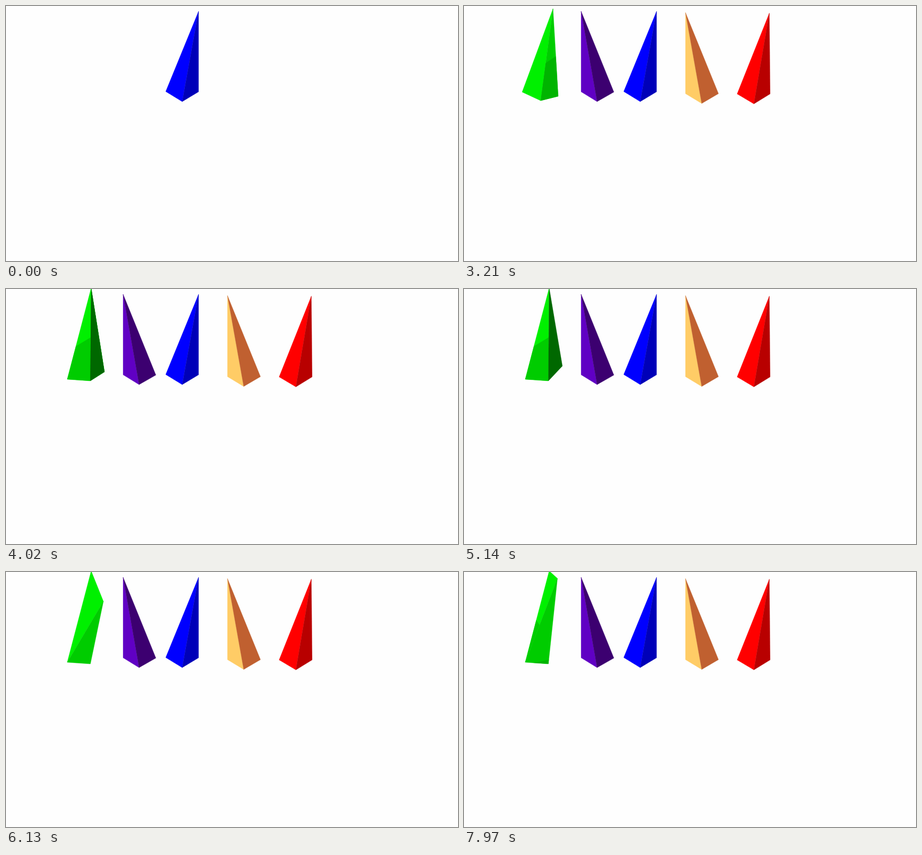
An HTML page with a canvas that plays this animation: 849x480 px, repeating every 8 s.

```html
<!DOCTYPE html>
<html>
<head>
<meta charset="utf-8">
<style>
html, body { margin: 0; height: 100%; overflow: hidden; background: #fefefe; }
canvas { display: block; }
</style>
</head>
<body>
<canvas id="stage" width="849" height="480"></canvas>
<script>
const ctx = document.getElementById('stage').getContext('2d');
const BRIGHT = '#00f000', MID = '#00cc00', DIM = '#00b400', DARK = '#008c00', DEEP = '#006800';

const clamp = (v, lo, hi) => Math.min(hi, Math.max(lo, v));
const mix = (a, b, u) => a.map((v, i) => v + (b[i] - v) * u);
const curve = (a, b, c, u) => a + b * u + c * u * u;

function trace(points) {
  ctx.beginPath();
  points.forEach(p => ctx.lineTo(...p));
  ctx.closePath();
}

// Each band [colour, y, slope] covers the face below a line through (150, y).
function face(points, color, bands = []) {
  ctx.save();
  trace(points);
  ctx.fillStyle = ctx.strokeStyle = color;
  ctx.lineWidth = 0.4;
  ctx.fill();
  ctx.stroke();
  ctx.clip();
  for (const [shade, y, slope] of bands) {
    trace([[50, y - 100 * slope], [250, y + 100 * slope], [250, 600], [50, 600]]);
    ctx.fillStyle = shade;
    ctx.fill();
  }
  ctx.restore();
}

function pyramid(apex, left, front, right, leftColor, rightColor) {
  face([apex, left, front], leftColor);
  face([apex, front, right], rightColor);
}

function turning(u) {
  const apex = [curve(169, -9, 0, u), curve(7, -9, 0, u)];
  const left = [curve(109.2, -1.5, 7.3, u), curve(160, 10, 0, u)];
  const front = [curve(140.3, 18, 0, u), curve(179.3, -5, -1.3, u)];
  const right = [curve(174, 15, -4, u), curve(173, -14, -3, u)];
  const rise = (from, to) => 200 - 220 * clamp((u - from) / (to - from), 0, 1);
  face([apex, left, front], BRIGHT, [[MID, 200 - 103.5 * clamp((u - 0.6) / 0.4, 0, 1), -0.6]]);
  face([apex, front, right], MID, [
    [DIM, rise(0, 0.5), -0.65], [DARK, rise(0.35, 0.75), -0.65], [DEEP, rise(0.6, 0.95), -0.65]
  ]);
}

function unfolding(step, slide) {
  const apex = [160, -2], left = [115, 170], front = [158.5, 173];
  const u = slide / 12;
  const right = mix(mix([185, 156], [182, 9], step / 54), [175.5, 12], u);
  if (step < 30) {
    const shade = step < 6 ? DEEP : step < 13 ? DARK : step < 22 ? DIM : MID;
    face([apex, left, front], BRIGHT, [[MID, 96.5, -0.6]]);
    face([apex, front, right], shade);
  } else {
    face([apex, left, right], BRIGHT, u ? [[MID, 200 - 88 * u, 1.5]] : []);
    face([left, front, right], MID, u ? [[DIM, 180 - 13 * u, -0.2]] : []);
  }
}

function draw(t) {
  const steps = (start, max) => clamp(Math.floor((t - start) / 30), 0, max);
  ctx.fillStyle = '#fefefe';
  ctx.fillRect(0, 0, 849, 480);

  pyramid([361.7, 10], [300, 161], [331, 180], [361.7, 161.5], '#0000ff', '#0000b8');
  if (t >= 1000)
    pyramid([220, 10], [220, 161.5], [250, 180], [281.5, 162], '#6000c4', '#3c0070');
  if (t >= 2000) {
    pyramid([416, 12.5], [416, 165], [446.5, 183.5], [478, 165], '#ffcc66', '#c06030');
    pyramid([573.5, 13.5], [513, 165.5], [544.5, 184.3], [575, 165.5], '#ff0000', '#b80000');
  }
  if (t >= 5050) unfolding(steps(5020, 54), steps(7610, 12));
  else if (t >= 3000) turning(steps(3000, 34) / 34);
}

const began = performance.now();
function tick() {
  draw((performance.now() - began) % 8000);
  requestAnimationFrame(tick);
}
tick();
</script>
</body>
</html>
```
